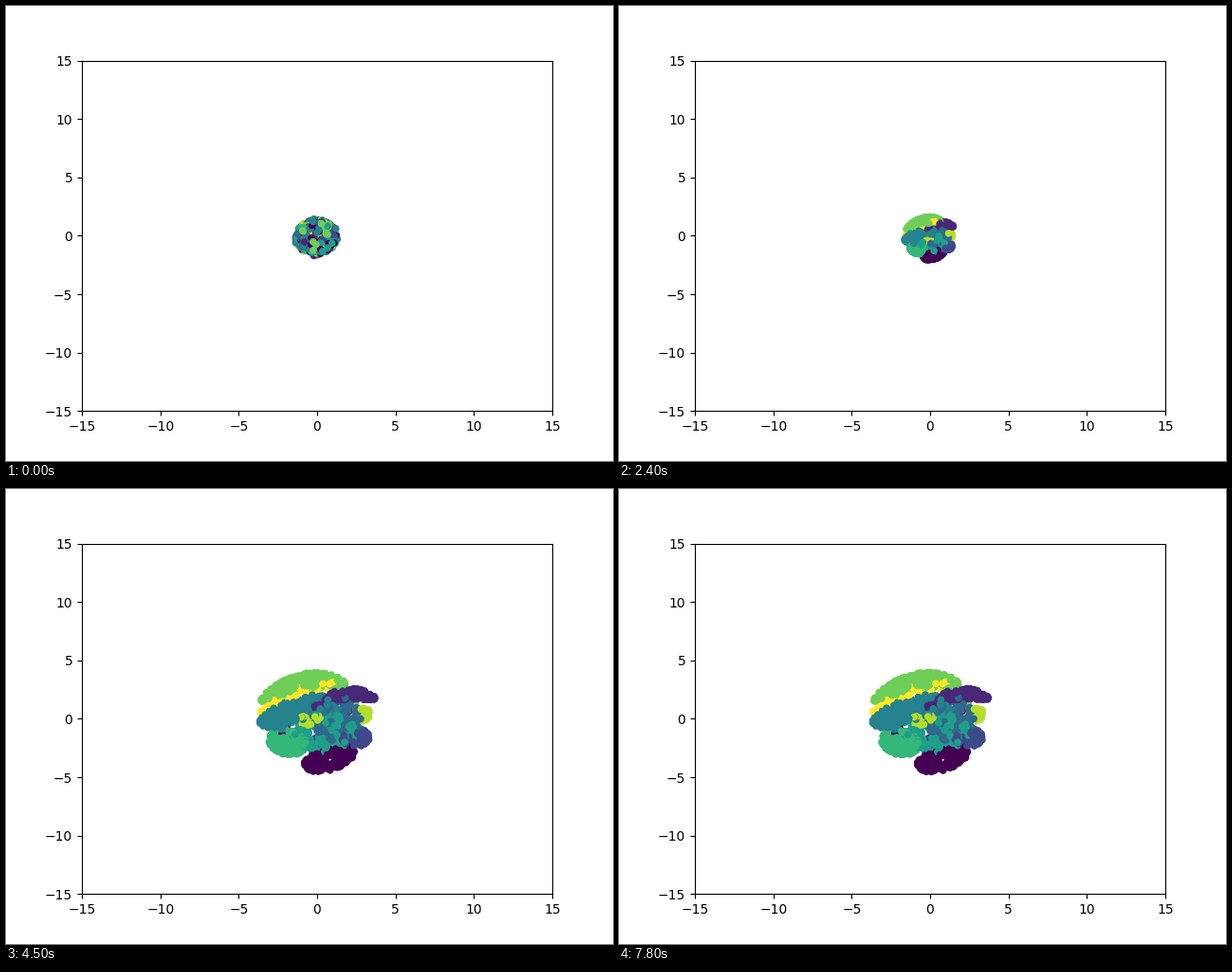
A matplotlib script for the animation above (8000 ms loop, 640 px wide and 480 px high).

```python
import numpy as np
import matplotlib.pyplot as plt
from matplotlib.animation import FuncAnimation

STEP_MS, TICK_MS, LOOP_MS = 300, 100, 8000
CENTER = np.array([0, -0.3])
rng = np.random.default_rng(7)

fig, ax = plt.subplots(figsize=(6.4, 4.8), dpi=100)
ax.set_xlim(-15, 15)
ax.set_ylim(-15, 15)


def disc(n):
    """Random points in the unit disc, a little denser towards its rim."""
    angle = rng.uniform(0, 2 * np.pi, n)
    radius = rng.uniform(0, 1, n) ** 0.4
    return np.column_stack([np.cos(angle), np.sin(angle)]) * radius[:, None]


labels, groups = [], []


def blob(label, count, x, y, width, height, slope=0, bend=0):
    """Add an ellipse of points, sheared by slope and curved by bend."""
    u, v = disc(count).T
    groups.append(np.column_stack([
        x + width * u,
        y + height * v + slope * width * u + bend * u ** 2,
    ]))
    labels.append(np.full(count, label))


blob(0, 260, 0.8, -3.5, 1.65, 0.95, slope=0.32, bend=0.15)
blob(1, 200, 1.8, 2.1, 2.0, 0.5, slope=0.19, bend=-0.75)
blob(2, 110, 2.45, -1.6, 0.9, 0.8)
blob(3, 150, 1.2, 0, 1.6, 2.0)
blob(4, 260, -2.1, 0.35, 1.6, 0.95, slope=0.4)
blob(4, 120, -0.2, 0.9, 1.4, 1.2)
blob(5, 230, 0.5, -1.2, 2.0, 1.7)
blob(6, 220, -1.9, -2.0, 1.2, 1.1, slope=-0.15)
blob(7, 280, -0.9, 3.2, 2.75, 0.7, slope=0.26, bend=-0.95)
blob(8, 35, -0.45, -0.05, 0.65, 0.6)
blob(8, 45, 2.85, 0.4, 0.55, 0.65)
blob(9, 75, -1.0, 2.35, 2.75, 0.45, slope=0.48, bend=-0.6)

order = rng.permutation(sum(map(len, labels)))
classes = np.concatenate(labels)[order]
settled = np.concatenate(groups)[order]
total = len(classes)

# A few points end up far from their own class.
stray = rng.random(total) < 0.025
settled[stray] = disc(stray.sum()) * (2.8, 2.8)

mixed = disc(total) * (1.2, 1.38) * rng.normal(1, 0.07, (total, 1)) + (-0.03, -0.1)

# Before the map settles some classes sit slightly off their final place.
young = settled.copy()
for label, lag in {0: (-0.25, 0.3), 1: (-0.2, 0.4), 4: (-0.2, -0.15)}.items():
    young[classes == label] += lag


def scaled(points, sx, sy):
    return CENTER + (points - CENTER) * (sx, sy)


# The upper left classes first gather into lumps, then fan out into arcs.
compact = scaled(young, 0.42, 0.45)
lumped = compact.copy()
for label, middle in {4: (-0.55, 0.9), 7: (-1.25, 0.5), 9: (-0.8, 0.5)}.items():
    mask = classes == label
    lumped[mask] = middle + disc(mask.sum()) * (0.45, 0.55)

stages = {
    0: mixed,
    4: lumped,
    8: compact,
    9: scaled(young, 1.15, 1.2),
    11: scaled(young, 1, 0.98),
    15: scaled(settled, 0.995, 0.995),
    26: settled,
}
steps = list(stages)


def positions(step):
    i = min(np.searchsorted(steps, step, side="right"), len(steps) - 1)
    a, b = steps[i - 1], steps[i]
    ease = 1 - (1 - (step - a) / (b - a)) ** 2
    return stages[a] + (stages[b] - stages[a]) * ease


cloud = ax.scatter(*mixed.T, c=classes, s=20, cmap="viridis", vmin=0, vmax=9)


def update(frame):
    cloud.set_offsets(positions(frame * TICK_MS // STEP_MS))
    return (cloud,)


anim = FuncAnimation(fig, update, frames=LOOP_MS // TICK_MS, interval=TICK_MS,
                     repeat=True, repeat_delay=0)
plt.show()
```
